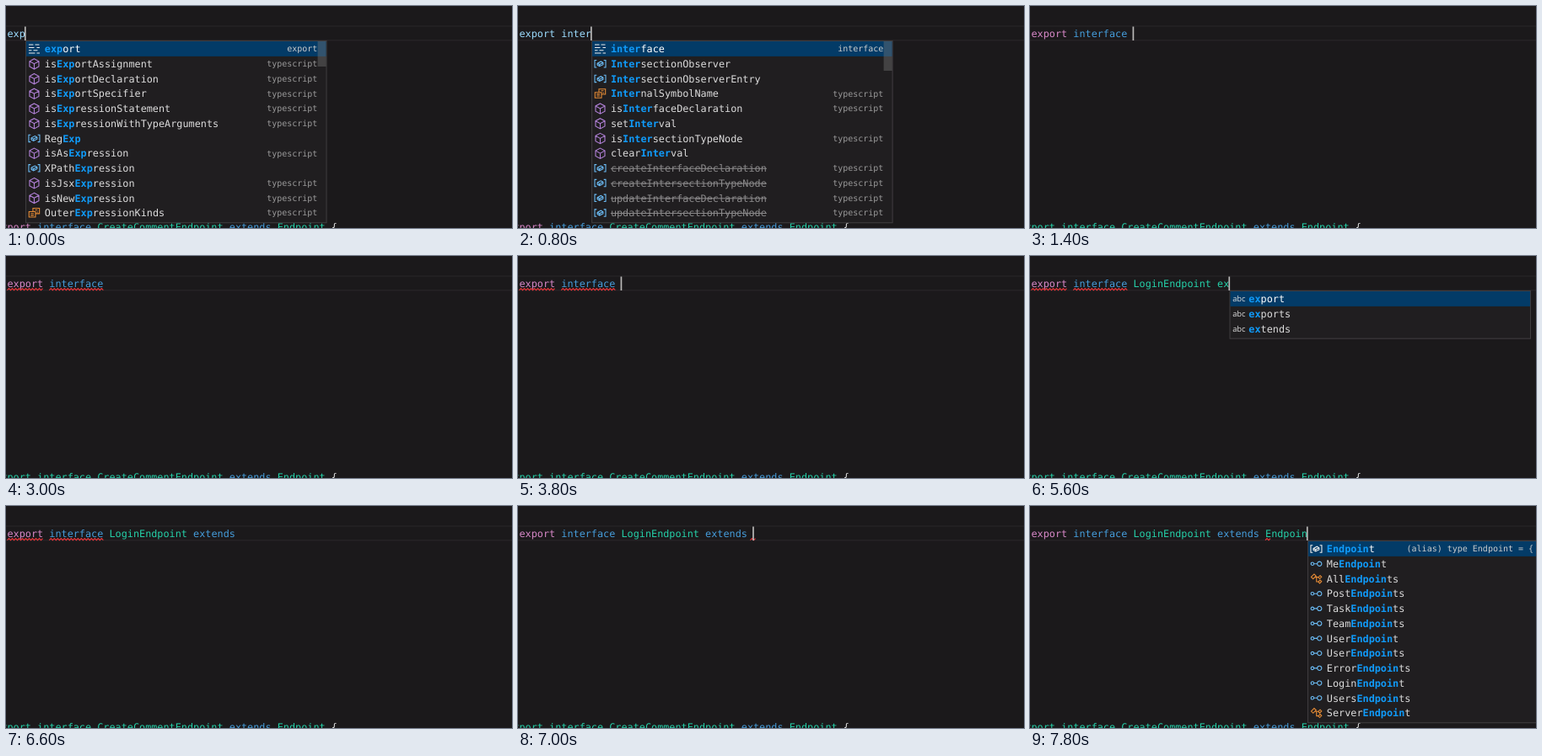
Animation of 600x264 px, one loop 8000 ms. Source, as an HTML page:

```html
<!DOCTYPE html>
<html lang="en">
<head>
<meta charset="utf-8">
<title>Editor autocomplete</title>
<style>
  html, body { margin: 0; width: 100%; height: 100%; overflow: hidden; background: #1b191b; }
  svg { display: block; width: 100%; height: 100%; }
  text { font: 11.82px "DejaVu Sans Mono", monospace; text-rendering: geometricPrecision; white-space: pre; }
  .match { font-weight: bold; }
  .detail { font-size: 10px; text-anchor: end; }
  .abc { font: 9.4px "Open Sans", sans-serif; }
</style>
</head>
<body>
<svg id="stage" viewBox="0 0 600 264"></svg>
<script>
const LOOP = 8000, STEP = 200;
const LEFT = 1.5, CHAR = 7.116, ROW = 17.73;
const COLORS = {
  plain: '#9cdcfe', keyword: '#d888c8', storage: '#459ddb', type: '#25d0a9',
  error: '#f0383c', match: '#109bfa', label: '#dcdcdc', detail: '#999'
};
const LINE = 'export interface LoginEndpoint extends Endpoint';

// [time, number of typed characters]
const TYPING = [
  [0, 3], [200, 5], [400, 7], [600, 10], [800, 12], [1000, 14], [1200, 15], [1400, 17],
  [4000, 18], [4200, 19], [4400, 21], [4600, 23], [4800, 25], [5000, 27], [5200, 29],
  [5400, 31], [5600, 33], [5800, 36], [6000, 39], [7200, 40], [7400, 42], [7600, 44], [7800, 46]
];

const ICONS = {
  keyword: ['#ddd', 'M-6.5-5H-1M1-5H6M-6.5-1.5H0M3-1.5H6.5M-6.5 1.8H-3M-1 1.8H4M-6.5 5H1M3 5H6.5'],
  method: ['#b180d7', 'M0-6 5.5-3V3.3L0 6.3-5.5 3.3V-3ZM-5.5-3 0 0 5.5-3M0 0V6.3'],
  variable: ['#6bbcf5', 'M-4.2-4.2H-6.5V4.2H-4.2M4.2-4.2H6.5V4.2H4.2M-3.4-.5 .8-2.8 3.4-1.3V.9L-.8 3-3.4 1.5ZM-3.4-.5-.8.8 3.4-1.3M-.8.8V3'],
  enum: ['#e58b35', 'M-1.5-1.5V-5.5H6.2V.8H2M-6.2-1.5H1.5V5H-6.2ZM1-3.5H4M3-1H4.5M-4.2.7H-.5M-4.2 2.8H-.5'],
  interface: ['#6bbcf5', 'M-2.8 0H1.2M1.2 0a2.6 2.6 0 1 0 5.2 0a2.6 2.6 0 1 0-5.2 0M-6.3 0a1.75 1.75 0 1 0 3.5 0a1.75 1.75 0 1 0-3.5 0'],
  class: ['#e58b35', 'M-6-2-2.5-5.5-.2-3.2-3.7.3ZM-1.5-1.8H2.5M.3-1.8V3.6H2.5M2.4-1.6 4.6-3.8 6.3-2.1 4.1.1ZM2.4 3.8 4.6 1.6 6.3 3.3 4.1 5.5Z']
};

const item = (icon, label, detail = '', deprecated = false) => ({ icon, label, detail, deprecated });
const items = (icon, labels, ...rest) => labels.split(' ').map(label => item(icon, label, ...rest));
const TS = 'typescript';

// one suggestion pool for each word of the line
const POOLS = [
  [
    item('keyword', 'export', 'export'),
    ...items('method', 'isExportAssignment isExportDeclaration isExportSpecifier isExpressionStatement isExpressionWithTypeArguments', TS),
    item('variable', 'RegExp'),
    item('method', 'isAsExpression', TS),
    item('variable', 'XPathExpression'),
    ...items('method', 'isJsxExpression isNewExpression', TS),
    item('enum', 'OuterExpressionKinds', TS)
  ],
  [
    item('keyword', 'interface', 'interface'),
    ...items('variable', 'IntersectionObserver IntersectionObserverEntry'),
    item('enum', 'InternalSymbolName', TS),
    item('method', 'isInterfaceDeclaration', TS),
    item('method', 'setInterval'),
    item('method', 'isIntersectionTypeNode', TS),
    item('method', 'clearInterval'),
    ...items('variable', 'createInterfaceDeclaration createIntersectionTypeNode updateInterfaceDeclaration updateIntersectionTypeNode', TS, true)
  ],
  items('abc', 'loginToken'),
  items('abc', 'export exports extends'),
  [
    item('variable', 'Endpoint', '(alias) type Endpoint = { url: text; }'),
    item('interface', 'MeEndpoint'),
    item('class', 'AllEndpoints'),
    ...items('interface', 'PostEndpoints TaskEndpoints TeamEndpoints UserEndpoint UserEndpoints ErrorEndpoints LoginEndpoint UsersEndpoints'),
    item('class', 'ServerEndpoint')
  ]
];

const rect = (x, y, w, h, fill, extra = '') =>
  `<rect x="${x}" y="${y}" width="${w}" height="${h}" fill="${fill}" ${extra}/>`;
const text = (x, y, str, fill, cls = '') =>
  `<text x="${x}" y="${y}" fill="${fill}" class="${cls}">${str}</text>`;
const column = n => LEFT + n * CHAR;

// Positions of the query's letters in a label, or null
function matchLetters(label, query) {
  let start = label.indexOf(query);
  if (start < 0) start = label.toLowerCase().indexOf(query.toLowerCase());
  if (start >= 0) return [...query].map((_, i) => start + i);
  const found = [];
  let from = 0;
  for (const letter of query.toLowerCase()) {
    const at = label.toLowerCase().indexOf(letter, from);
    if (at < 0) return null;
    found.push(at);
    from = at + 1;
  }
  return found;
}

function codeLine(str, firstColumn, y, colorOf) {
  return [...str.matchAll(/\S+/g)]
    .map(m => text(column(firstColumn + m.index), y, m[0], colorOf(m[0]))).join('');
}

function squiggle(x, width) {
  let d = `M${x} 40.6`;
  for (let dx = 2, up = true; dx <= width; dx += 2, up = !up) d += `l2 ${up ? -2 : 2}`;
  return `<path d="${d}" fill="none" stroke="${COLORS.error}" stroke-width="1.1"/>`;
}

function icon(name, x, y, selected) {
  if (name === 'abc') return text(x - 6.8, y + 3.2, 'abc', '#ddd', 'abc');
  const [color, d] = ICONS[name];
  return `<path transform="translate(${x} ${y})" d="${d}" fill="none" stroke="${selected ? '#eee' : color}" stroke-width="1.1"/>`;
}

function labelText({ label, deprecated }, letters, x, y, selected) {
  if (deprecated) {
    return text(x, y, label, '#8a898a') + rect(x, y - 4.2, label.length * CHAR, 1, '#8a898a');
  }
  let out = '';
  for (let i = 0, end; i < label.length; i = end) {
    const hit = letters.includes(i);
    for (end = i + 1; end < label.length && letters.includes(end) === hit;) end++;
    const color = hit ? COLORS.match : selected ? '#fff' : COLORS.label;
    out += text(x + i * CHAR, y, label.slice(i, end), color, hit ? 'match' : '');
  }
  return out;
}

function popup(typed) {
  const words = typed.split(' '), query = words.at(-1);
  if (!query) return '';
  const pool = POOLS[words.length - 1];
  const rows = pool.map(entry => ({ entry, letters: matchLetters(entry.label, query) })).filter(r => r.letters);
  if (!rows.length) return '';

  const x = column(typed.length);
  let out = rect(x + .7, 41.5, 356.5, rows.length * ROW + 3.5, '#201e20', 'stroke="#403e40"')
    + rect(x + 1.2, 42, 355.5, 17.9, '#033b67');
  rows.forEach(({ entry, letters }, i) => {
    const y = 51 + i * ROW, selected = i === 0;
    out += icon(entry.icon, x + 10.6, y, selected)
      + labelText(entry, letters, x + 23, y + 4.2, selected)
      + text(x + 346.5, y + 3.4, entry.detail, selected ? '#ccc' : COLORS.detail, 'detail');
  });
  if (rows.length === 12) out += rect(x + 346.7, 42, 10, words.length === 1 ? 30 : 35, '#797979', 'opacity=".4"');
  return out;
}

function draw(t) {
  const [typedAt, count] = TYPING.findLast(([time]) => time <= t);
  const typed = LINE.slice(0, count), isInterface = count > 15;
  const typedColor = word => !isInterface ? COLORS.plain
    : word === 'export' ? COLORS.keyword
    : word === 'interface' || word === 'extends' ? COLORS.storage : COLORS.type;
  const nextColor = word => word === '{' ? '#ddd'
    : word === 'extends' ? COLORS.storage
    : isInterface ? COLORS.type
    : word === 'export' ? COLORS.keyword
    : word === 'interface' ? COLORS.storage : COLORS.type;

  let out = rect(0, 0, 600, 264, '#1b191b') + rect(0, 23.5, 600, 1, '#2b292b') + rect(0, 40.3, 600, 1, '#2b292b')
    + codeLine('export interface CreateCommentEndpoint extends Endpoint {', -2, 267.3, nextColor)
    + codeLine(typed, 0, 36.6, typedColor);
  if (t >= 2200 && t < 6800) out += squiggle(column(0), 6 * CHAR) + squiggle(column(7), 9 * CHAR);
  if (t >= 6800) out += t < 7200 ? squiggle(column(39) - 3.5, 6) : squiggle(column(39), 7);
  out += popup(typed);

  const cursorOn = Math.floor((t - typedAt + 50) / 500) % 2 === 0;
  if (cursorOn) out += rect(column(count) - .9, 24.5, 1.7, 16.5, '#b9b8b7');
  document.getElementById('stage').innerHTML = out;
}

let shown = -1;
function tick() {
  const t = Math.floor(performance.now() % LOOP / STEP) * STEP;
  if (t !== shown) draw(shown = t);
  requestAnimationFrame(tick);
}
tick();
</script>
</body>
</html>
```
